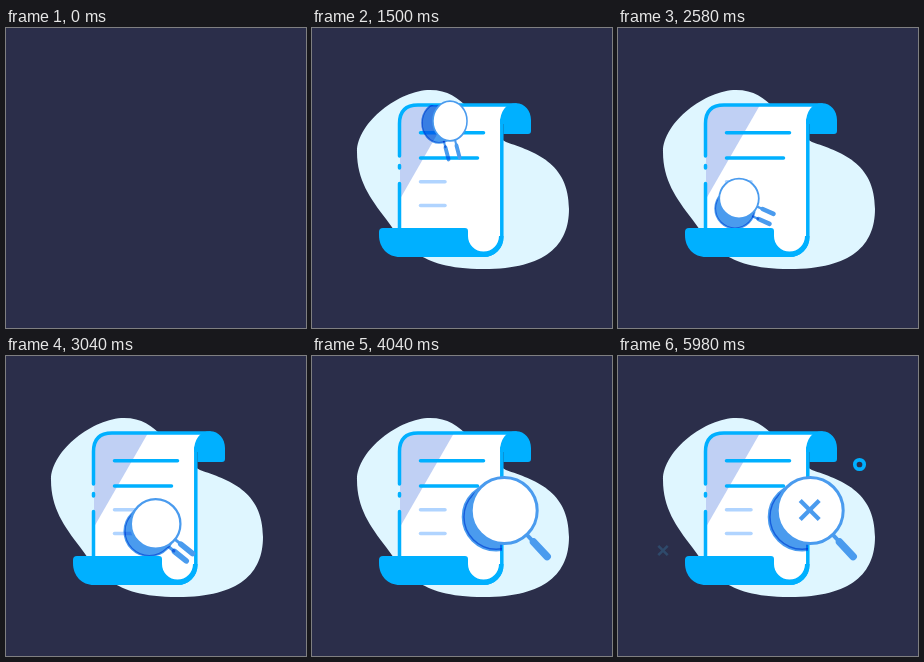
Write an HTML page with a canvas that moves like this. It is 300 px wide and 300 px high and loops after 6.02 s.

```html
<!DOCTYPE html>
<html lang="en">
<head>
<meta charset="utf-8">
<title>Document search</title>
<style>
html, body { margin: 0; width: 100%; height: 100%; overflow: hidden; background: #2b2e4a; }
canvas { display: block; width: 100vw; height: 100vh; }
</style>
</head>
<body>
<canvas id="stage"></canvas>
<script>
const SIZE = 300, LOOP = 6020;
const BG = '#2b2e4a', CYAN = '#00b0ff', BLUE = '#4a9bee', PALE = '#b0d4ff', FOLD = '#c0d0f4';
const canvas = document.getElementById('stage');
const ctx = canvas.getContext('2d');
const ratio = window.devicePixelRatio || 1;
canvas.width = canvas.height = SIZE * ratio;

const blob = new Path2D('M45 124C45 94 88 62 118 62C136 62 146 70 156 80C170 94 180 107 194 114' +
  'C222 124 257 134 257 181C257 217 234 241 172 241C136 241 118 234 106 226' +
  'C92 216 84 205 74 191C58 170 45 152 45 124Z');
const paper = new Path2D('M88 222V95Q88 77 106 77H205Q190 78 190 94V211A18.5 18.5 0 0 1 171.5 228H88Z');
const fold = new Path2D('M88 171V95Q88 77 106 77H142Z');
const outline = new Path2D('M87.5 128V95.5Q87.5 77 106 77H204M87.5 137.5V140M87.5 155.5V212');
const rightEdge = new Path2D('M189.8 92V209A18 18 0 0 1 171.5 227.2');
const topRoll = new Path2D('M188 96C188 83 194 75.3 204 75.3C213 75.3 219 83 219 92V103Q219 106 216 106H191.5V96Z');
const bottomRoll = new Path2D('M71 200H153Q156 200 156 203V208A15.5 15.5 0 0 0 187 208H191.5V209' +
  'A20 20 0 0 1 171.5 229H88C76 229 67 220 67 207V204Q67 200 71 200Z');

// y, right end, colour, start time
const textLines = [
  [104.7, 171.5, CYAN, 300],
  [130, 165.5, CYAN, 420],
  [153.7, 133, PALE, 540],
  [177.5, 133, PALE, 660]
];

// time, x, y, scale, angle, horizontal squeeze, shadow dx, shadow dy
const lensKeys = [
  [1240, 112, 96, 0, 85, 0.6, -11, 2],
  [1500, 138, 93, 0.6, 73, 0.86, -11, 2],
  [1840, 164, 100, 0.6, 60, 1, -8, 4],
  [2200, 128, 134, 0.6, 40, 1, -5, 8],
  [2580, 121, 170.5, 0.6, 24, 1, -4, 10],
  [2900, 140, 172, 0.7, 35, 1, -6, 8],
  [3460, 201, 146, 1.02, 59, 1, -8, 4],
  [3900, 192.2, 154.5, 1, 47, 1, -8, 6.5]
];

const progress = (t, from, to) => Math.min(1, Math.max(0, (t - from) / (to - from)));
const smooth = p => p * p * (3 - 2 * p);
const easeOut = p => 1 - (1 - p) ** 3;
const eased = (t, from, to) => smooth(progress(t, from, to));

function lensPose(t) {
  let i = 0;
  while (i < lensKeys.length - 2 && t > lensKeys[i + 1][0]) i++;
  const a = lensKeys[i], b = lensKeys[i + 1], p = eased(t, a[0], b[0]);
  return a.map((v, k) => v + (b[k] - v) * p);
}

function fill(path, color) {
  ctx.fillStyle = color;
  ctx.fill(path);
}

function stroke(path, color, width) {
  ctx.strokeStyle = color;
  ctx.lineWidth = width;
  ctx.stroke(path);
}

function line(x1, y1, x2, y2, color, width) {
  const path = new Path2D();
  path.moveTo(x1, y1);
  path.lineTo(x2, y2);
  stroke(path, color, width);
}

function clipped(clip, draw) {
  ctx.save();
  ctx.clip(clip);
  draw();
  ctx.restore();
}

function clipRows(top, bottom, draw) {
  const area = new Path2D();
  area.rect(0, top, SIZE, Math.max(0, bottom - top));
  clipped(area, draw);
}

function cross(x, y, half, color, width) {
  line(x - half, y - half, x + half, y + half, color, width);
  line(x - half, y + half, x + half, y - half, color, width);
}

function glass([, x, y, scale, angle, squeeze], inner) {
  const turn = angle * Math.PI / 180, c = Math.cos(turn), s = Math.sin(turn);
  const disc = new Path2D();
  disc.arc(0, 0, 33, 0, 7);
  ctx.save();
  ctx.translate(x, y);
  ctx.scale(scale * squeeze, scale);
  line(33 * c, 33 * s, 42 * c, 42 * s, BLUE, 4);
  line(43 * c, 43 * s, 63 * c, 63 * s, BLUE, 7.5);
  fill(disc, inner);
  stroke(disc, BLUE, 3);
  ctx.restore();
}

function drawDocument(t, lens) {
  clipRows(70, 75 + 155 * easeOut(progress(t, 0, 460)), () => {
    fill(paper, '#fff');
    fill(fold, FOLD);
    stroke(outline, CYAN, 3.5);
    stroke(rightEdge, CYAN, 3.5);
    fill(topRoll, CYAN);
  });
  for (const [y, end, color, start] of textLines) {
    const p = eased(t, start, start + 400);
    if (p) line(108.5, y, 108.5 + (end - 108.5) * p, y, color, 3.5);
  }
  if (lens) clipped(paper, () => {
    const shadow = lens.slice();
    shadow[1] += lens[6];
    shadow[2] += lens[7];
    ctx.globalCompositeOperation = 'multiply';
    glass(shadow, BLUE);
  });
  clipRows(229 - 30 * eased(t, 480, 770), 232, () => fill(bottomRoll, CYAN));
}

function draw(t) {
  ctx.setTransform(canvas.width / SIZE, 0, 0, canvas.height / SIZE, 0, 0);
  ctx.fillStyle = BG;
  ctx.fillRect(0, 0, SIZE, SIZE);
  if (t < 20) return;
  ctx.lineCap = 'round';

  ctx.globalAlpha = progress(t, 620, 674);
  fill(blob, '#dff6ff');
  ctx.globalAlpha = 1;

  const lens = t > 1240 ? lensPose(t) : null;
  drawDocument(t, lens);
  if (lens) glass(lens, '#fff');

  ctx.lineCap = 'butt';
  const mark = eased(t, 4300, 4650);
  if (mark) cross(191.7, 154, 9.5 * mark, BLUE, 4.2 * mark);

  const ring = eased(t, 4640, 4960);
  if (ring) {
    const circle = new Path2D();
    circle.arc(241.5, 108.5, 4.7 * ring, 0, 7);
    stroke(circle, CYAN, 3.7 * ring);
  }

  const small = eased(t, 5080, 5560);
  if (small) cross(45, 194.5, 4.7 * small, '#2f4a6b', 2.6 * small);
}

const begin = performance.now();
function tick() {
  draw((performance.now() - begin) % LOOP);
  requestAnimationFrame(tick);
}
tick();
</script>
</body>
</html>
```
